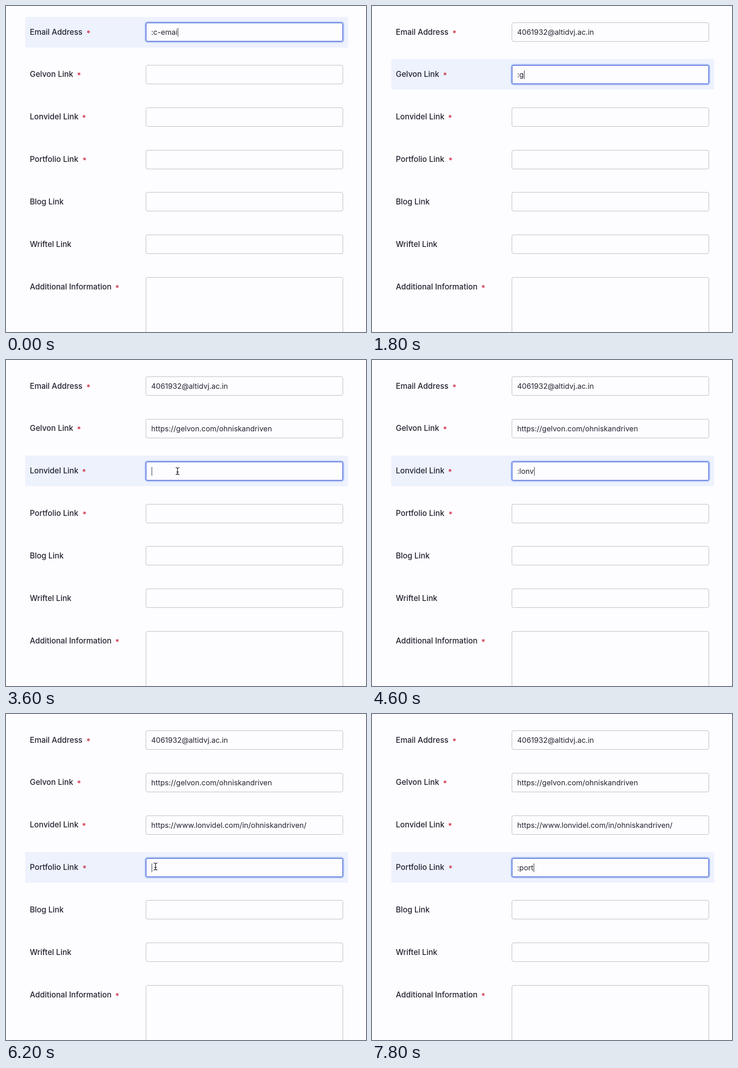
An HTML page that plays this animation: 786x713 px, repeating every 8000 ms.

```html
<!DOCTYPE html>
<html lang="en">
<head>
<meta charset="utf-8">
<title>Form autofill</title>
<style>
  html, body { margin: 0; width: 100%; height: 100%; overflow: hidden; background: #fdfcff; }
  #form {
    position: relative; width: 786px; height: 713px; overflow: hidden;
    font-family: Inter, Roboto, sans-serif; color: #22242f;
  }
  .row { position: absolute; left: 42px; width: 704.5px; height: 67px; border-radius: 3px; }
  .row.active { background: #edf2fd; }
  .label {
    position: absolute; left: 10px; top: 20px; line-height: 26px;
    font-size: 16.9px; font-weight: 500; white-space: pre;
  }
  .star {
    position: absolute; top: 23px; width: 20px; line-height: 26px;
    font-size: 17px; font-weight: 500; text-align: center; color: #cc2b3f;
  }
  .field {
    position: absolute; left: 263px; top: 12.5px; width: 431px; height: 42px;
    box-sizing: border-box; padding-left: 11px; background: #fdfcff;
    border: 1px solid #b8bbc0; border-radius: 4px;
    display: flex; align-items: center; font-size: 16px; white-space: pre;
  }
  .hover .field { border-color: #8fa5ed; box-shadow: 0 0 0 2px #c9d6f9; }
  .active .field { border-color: #3e5ed6; box-shadow: inset 0 0 0 .5px #3e5ed6, 0 0 0 2.5px #bccdf8; }
  .area { height: 150px; }
  .caret { width: 1.2px; height: 19px; margin: 1px 0 0 .5px; background: #22242f; visibility: hidden; }
  #pointer {
    position: absolute; left: -10px; top: -12px;
    fill: none; stroke: #22242f; stroke-width: 1.4; stroke-linecap: round;
  }
  #pointer .halo { stroke: #fff; stroke-width: 3; }
</style>
</head>
<body>
<div id="form"></div>
<script>
const form = document.getElementById('form');
const LOOP = 8000;
const PITCH = 92.85;

// label, centre of the required mark (0 = optional), filled-in value
const FIELDS = [
  ['Email Address', 180, '4061932@altidvj.ac.in'],
  ['Gelvon Link', 159.5, 'https://gelvon.com/ohniskandriven'],
  ['Lonvidel Link', 170.5, 'https://www.lonvidel.com/in/ohniskandriven/'],
  ['Portfolio Link', 171.5, ''],
  ['Blog Link', 0, ''],
  ['Wriftel Link', 0, ''],
  ['Additional Information', 243, '']
];

// start time, focused row, its text, pointer [x, y, hovered row]
const STEPS = [
  [0, 0, ':c-emai'],
  [200, 0, ':c-email'],
  [600, 0, ':c-email:'],
  [800, 0, FIELDS[0][2]],
  [1000, 0, FIELDS[0][2], [407.5, 149.5, 1]],
  [1200, 1, '', [407.5, 149.5]],
  [1600, 1, ':'],
  [1800, 1, ':g'],
  [2000, 1, ':gel'],
  [2200, 1, ':gelv'],
  [2400, 1, ':gelvon'],
  [2800, 1, ':gelvon:'],
  [3000, 1, FIELDS[1][2]],
  [3200, 1, FIELDS[1][2], [376, 239, 2]],
  [3400, 2, '', [374.5, 243]],
  [4000, 2, ':'],
  [4200, 2, ':l'],
  [4400, 2, ':lo'],
  [4600, 2, ':lonv'],
  [4800, 2, ':lonvi'],
  [5000, 2, ':lonvide'],
  [5200, 2, ':lonvidel'],
  [5600, 2, ':lonvidel:'],
  [5800, 2, FIELDS[2][2]],
  [6000, 2, FIELDS[2][2], [328, 329, 3]],
  [6200, 3, '', [326.5, 333.5]],
  [6800, 3, ''],
  [7000, 3, ':'],
  [7200, 3, ':p'],
  [7400, 3, ':po'],
  [7600, 3, ':por'],
  [7800, 3, ':port']
];

function add(parent, cls, text = '') {
  const el = document.createElement('div');
  el.className = cls;
  el.textContent = text;
  parent.append(el);
  return el;
}

const rows = FIELDS.map(([label, star], i) => {
  const el = add(form, 'row');
  el.style.top = 23.5 + i * PITCH + 'px';
  add(el, 'label', label);
  if (star) add(el, 'star', '*').style.left = star - 52 + 'px';
  const field = add(el, i === FIELDS.length - 1 ? 'field area' : 'field');
  return { el, text: add(field, 'text'), caret: add(field, 'caret') };
});

const beam = 'M-3.5-7.5Q-.5-7.5 0-5.5Q.5-7.5 3.5-7.5M0-5.5V5.5M-3.5 7.5Q-.5 7.5 0 5.5Q.5 7.5 3.5 7.5M-2 2H2';
form.insertAdjacentHTML('beforeend', `
  <svg id="pointer" width="20" height="24" viewBox="-10 -12 20 24">
    <path class="halo" d="${beam}"/><path d="${beam}"/>
  </svg>`);
const pointer = document.getElementById('pointer');

function show([, active, text, at]) {
  rows.forEach((row, i) => {
    const on = i === active;
    row.el.classList.toggle('active', on);
    row.el.classList.toggle('hover', !!at && at[2] === i);
    row.text.textContent = on ? text : i < active ? FIELDS[i][2] : '';
    // the caret is blinked off while the pointer heads for the next field
    row.caret.style.visibility = on && !(at && at[2]) ? 'visible' : 'hidden';
  });
  pointer.style.display = at ? 'block' : 'none';
  if (at) pointer.style.transform = `translate(${at[0]}px, ${at[1]}px)`;
}

let shown;
function tick() {
  const t = performance.now() % LOOP;
  const step = STEPS.findLast(s => s[0] <= t);
  if (step !== shown) show(shown = step);
  requestAnimationFrame(tick);
}
tick();
</script>
</body>
</html>
```
